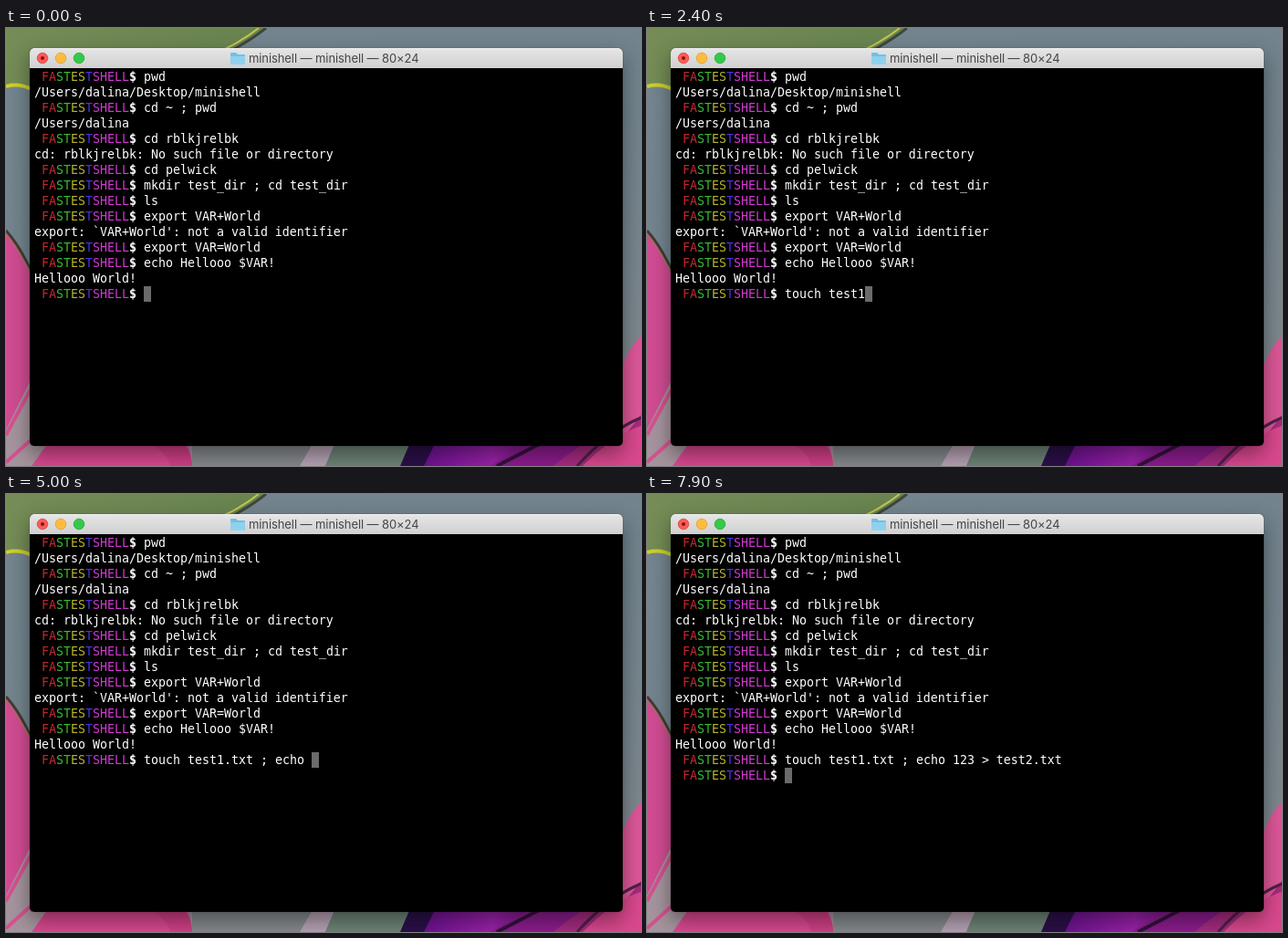
These frames come from a looping animation (696x480 px, 8000 ms). An HTML page:

```html
<!DOCTYPE html>
<html lang="en">
<head>
<meta charset="utf-8">
<title>minishell</title>
<style>
html, body { margin: 0; width: 100%; height: 100%; overflow: hidden; background: #6f808a; }
#stage { position: relative; width: 696px; height: 480px; overflow: hidden; }
#wall { position: absolute; left: 0; top: 0; }
#win {
  position: absolute; left: 26px; top: 22px; width: 650px; height: 436px;
  border-radius: 5px; background: #000; overflow: hidden;
}
#shade {
  position: absolute; left: 26px; top: 22px; width: 650px; height: 436px; border-radius: 5px;
  box-shadow: 0 0 1px rgba(0,0,0,.7), 0 9px 22px rgba(0,0,0,.42);
}
#bar {
  position: absolute; left: 0; top: 0; width: 650px; height: 22px;
  background: linear-gradient(#f0f0f0, #e4e4e4 8%, #d0d0d0);
}
#bar svg { position: absolute; left: 0; top: 0; }
#bar span {
  position: absolute; left: 240px; top: 0; line-height: 23px; white-space: pre;
  font: 13px/23px Inter, "Liberation Sans", sans-serif; letter-spacing: -.09px; color: #454545;
}
#term {
  position: absolute; left: 5px; top: 23px; margin: 0; color: #fff;
  font: 500 13.29px/17px "DejaVu Sans Mono", monospace; white-space: pre;
}
#term div { height: 17px; }
#term b { font-weight: 700; }
.r { color: #c1272d; } .g { color: #35bd35; } .y { color: #b4b42c; }
.u { color: #4a34e0; } .m { color: #d338d3; }
#term i { display: inline-block; width: 8px; height: 17px; background: #6b6b6b; vertical-align: top; }
</style>
</head>
<body>
<div id="stage">
  <svg id="wall" width="696" height="480" viewBox="0 0 696 480">
    <defs>
      <linearGradient id="slate" x2="1" y2="1">
        <stop offset="0" stop-color="#74858f"/><stop offset=".6" stop-color="#72838d"/><stop offset="1" stop-color="#83898d"/>
      </linearGradient>
      <linearGradient id="leaf">
        <stop offset="0" stop-color="#758c56"/><stop offset="1" stop-color="#68834f"/>
      </linearGradient>
      <linearGradient id="plum">
        <stop offset="0" stop-color="#6c1290"/><stop offset=".5" stop-color="#9a22aa"/><stop offset="1" stop-color="#5d1268"/>
      </linearGradient>
    </defs>
    <rect width="696" height="480" fill="url(#slate)"/>
    <path d="M0 0H284Q268 12 248 24L26 66Q12 61 0 65Z" fill="url(#leaf)"/>
    <path d="M0 64Q14 60 28 67" fill="none" stroke="#cdd02c" stroke-width="4"/>
    <path d="M277 0Q262 12 240 23" fill="none" stroke="#c3c74e" stroke-width="2"/>
    <path d="M285 0Q270 12 250 23" fill="none" stroke="#3d473f" stroke-width="3"/>
    <path d="M0 222Q15 240 27 268V480H0Z" fill="#d14c93"/>
    <path d="M0 222Q16 240 28 268" fill="none" stroke="#423c35" stroke-width="3"/>
    <path d="M0 226Q12 240 26 266" fill="none" stroke="#8d8a3d" stroke-width="1"/>
    <path d="M0 440L27 386V458H205V480H0Z" fill="#a5949d"/>
    <path d="M0 446L27 396M0 476L40 440" stroke="#d5528f" stroke-width="4"/>
    <path d="M28 480L48 452H195Q204 464 204 480Z" fill="#d8488f"/>
    <path d="M150 452Q176 462 180 480H204Q204 464 190 452Z" fill="#cf3f86"/>
    <path d="M204 452H335L326 480H204Z" fill="#85898c"/>
    <path d="M322 480L338 452H362L350 480Z" fill="#b5a1b3"/>
    <path d="M350 480L362 452H445L433 480Z" fill="#6d8375"/>
    <path d="M432 480L444 452H474L460 480Z" fill="#2a1048"/>
    <path d="M458 480L472 452H610L560 480Z" fill="url(#plum)"/>
    <path d="M530 480L580 452H652L620 480Z" fill="#8b1c8d"/>
    <path d="M538 480L592 452" stroke="#35103d" stroke-width="4"/>
    <path d="M600 480Q640 446 696 424V480Z" fill="#a52b7f"/>
    <path d="M696 338Q682 350 674 376V452L696 424Z" fill="#dc5798"/>
    <path d="M632 480Q668 444 696 436V480Z" fill="#d9488d"/>
    <path d="M626 480Q660 442 696 427" fill="none" stroke="#512044" stroke-width="3"/>
  </svg>
  <div id="shade"></div>
  <div id="win">
    <div id="bar">
      <svg width="650" height="22">
        <g stroke-width=".8">
          <circle cx="14" cy="11" r="5.8" fill="#fc5b57" stroke="#df443f"/>
          <circle cx="34" cy="11" r="5.8" fill="#fdbc40" stroke="#de9f34"/>
          <circle cx="54" cy="11" r="5.8" fill="#35c84a" stroke="#27aa35"/>
        </g>
        <circle cx="14" cy="11" r="2" fill="#7e1714"/>
        <path d="M220 6q0-1 1-1h5l2 2h7q1 0 1 1v9q0 1-1 1h-14q-1 0-1-1z" fill="#72bfe3"/>
        <path d="M220 9h16v8q0 1-1 1h-14q-1 0-1-1z" fill="#8ed1ef"/>
      </svg>
      <span>minishell — minishell — 80×24</span>
    </div>
    <div id="term"></div>
  </div>
</div>
<script>
const LOOP = 8000, ENTER = 7800;
const CMD = "touch test1.txt ; echo 123 > test2.txt";
// time of each keystroke, in tenths of a second
const KEYS = [12, 13, 15, 16, 17, 18, 19, 20, 21, 22, 24,
  29, 31, 32, 33, 35, 40, 42, 43, 44, 45, 46, 48,
  51, 52, 54, 56, 58, 60, 63, 64, 66, 67, 68, 70, 71, 73, 75];

const PROMPT = " " + [["r", "FA"], ["g", "ST"], ["y", "ES"], ["u", "T"], ["m", "SHELL"]]
  .map(([c, s]) => `<span class="${c}">${s}</span>`).join("") + "<b>$</b> ";

// lines that start with "$ " follow a prompt
const LOG = `$ pwd
/Users/dalina/Desktop/minishell
$ cd ~ ; pwd
/Users/dalina
$ cd rblkjrelbk
cd: rblkjrelbk: No such file or directory
$ cd pelwick
$ mkdir test_dir ; cd test_dir
$ ls
$ export VAR+World
export: \`VAR+World': not a valid identifier
$ export VAR=World
$ echo Hellooo $VAR!
Hellooo World!`.split("\n");

const term = document.getElementById("term");
function addLine(html) {
  const row = document.createElement("div");
  row.innerHTML = html;
  term.append(row);
  return row;
}
LOG.forEach(s => addLine(s.startsWith("$ ") ? PROMPT + s.slice(2) : s));
const input = addLine(PROMPT + "<span></span><i></i>");
const next = addLine(PROMPT + "<i></i>");
const typed = input.querySelector("span:last-of-type");
const caret = input.querySelector("i");

function draw(now) {
  const t = now % LOOP;
  const text = CMD.slice(0, KEYS.filter(k => k * 100 <= t).length);
  if (typed.textContent !== text) typed.textContent = text;
  const done = t >= ENTER;
  caret.style.visibility = done ? "hidden" : "visible";
  next.style.visibility = done ? "visible" : "hidden";
}
function tick() {
  draw(performance.now());
  requestAnimationFrame(tick);
}
tick();
</script>
</body>
</html>
```
